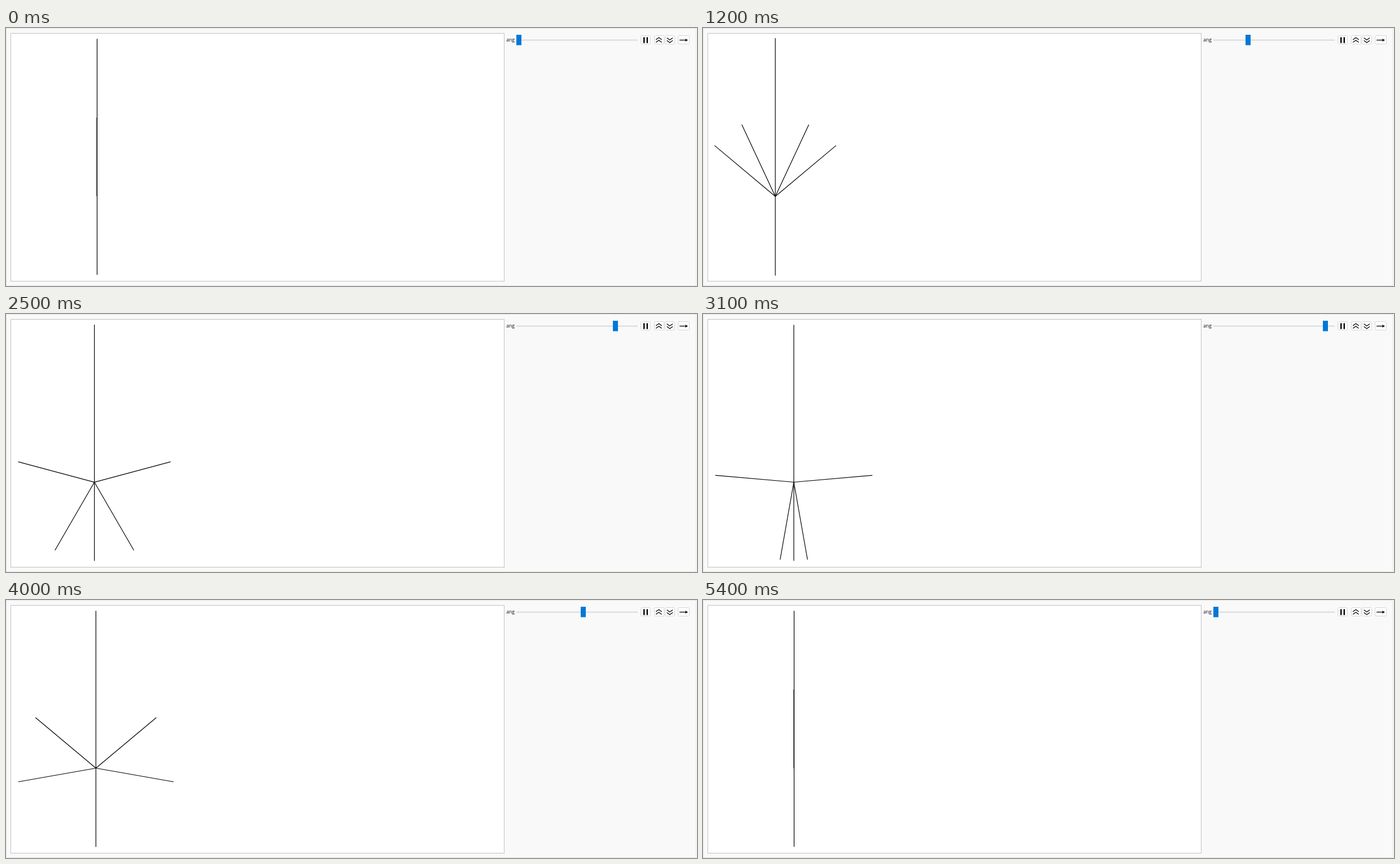
Animation of 1224 by 458 pixels, one loop 6000 ms. Source, as an HTML page with a canvas:

```html
<!DOCTYPE html>
<html lang="en">
<head>
<meta charset="utf-8">
<title>Angle slider</title>
<style>
  html, body { margin: 0; width: 100%; height: 100%; overflow: hidden; background: #fff; }
  canvas { display: block; }
</style>
</head>
<body>
<canvas id="stage" width="1224" height="458"></canvas>
<script>
const ctx = document.getElementById('stage').getContext('2d');
const LOOP = 6000;
const INK = '#000';

// The angle rises and falls in 5 degree steps, shown on a 100 ms grid.
function angleAt(ms) {
  const tick = Math.floor(ms / 100) * 100;
  const step = Math.max(0, Math.min(36, Math.ceil((tick - 550) / 137)));
  return 5 * (step <= 18 ? step : 36 - step);
}

function rect(x, y, w, h, fill) {
  ctx.fillStyle = fill;
  ctx.fillRect(x, y, w, h);
}

function frame(x, y, w, h, fill, stroke) {
  rect(x, y, w, h, fill);
  ctx.strokeStyle = stroke;
  ctx.lineWidth = 1;
  ctx.strokeRect(x + 0.5, y + 0.5, w - 1, h - 1);
}

function path(points, width) {
  ctx.beginPath();
  points.forEach(([x, y]) => ctx.lineTo(x, y));
  ctx.strokeStyle = INK;
  ctx.lineWidth = width;
  ctx.stroke();
}

function button(x, w) {
  ctx.beginPath();
  ctx.roundRect(x + 0.5, 13.5, w - 1, 15, 2);
  ctx.fillStyle = '#fefefe';
  ctx.fill();
  ctx.strokeStyle = '#d6d6d6';
  ctx.lineWidth = 1;
  ctx.stroke();
}

function chevron(x, y, dy) {
  path([[x - 5.2, y], [x, y + dy], [x + 5.2, y]], 1.3);
}

function drawControls(angle) {
  ctx.font = '8.7px "Open Sans", "Noto Sans", sans-serif';
  ctx.fillStyle = '#111';
  ctx.fillText('ang', 886.2, 24);

  rect(904, 20.5, 215, 2, '#dadada');
  rect(Math.floor(904 + 2.288 * angle), 12, 9, 18.5, '#0078d7');

  button(1124, 18);
  rect(1129, 16.3, 2.4, 10.4, INK);
  rect(1134.6, 16.3, 2.4, 10.4, INK);

  button(1148, 18);
  chevron(1156.4, 20.8, -3.8);
  chevron(1156.4, 25.6, -3.8);

  button(1167, 18);
  chevron(1175.8, 17.4, 3.8);
  chevron(1175.8, 22.2, 3.8);

  button(1190, 21);
  path([[1193, 21.5], [1205, 21.5]], 1.3);
  ctx.beginPath();
  ctx.moveTo(1208, 21.5);
  ctx.lineTo(1203, 18.7);
  ctx.lineTo(1204, 21.5);
  ctx.lineTo(1203, 24.3);
  ctx.fillStyle = INK;
  ctx.fill();
}

// The plot is scaled to a fixed height; its margin follows its width.
function drawSpokes(angle) {
  const a = angle * Math.PI / 180;
  const half = angle ? Math.max(Math.sin(a), Math.sin(2 * a)) : 1;
  const margin = 0.0208 * 2 * half;
  const unit = 430.4 / (3 + 2 * margin);
  const cx = 16 + unit * (margin + half);
  const cy = 228.7 + unit / 2;

  path([[cx, cy - 2 * unit], [cx, cy + unit]], 1.2);
  for (const turn of [-2 * a, -a, a, 2 * a]) {
    path([[cx, cy], [cx + unit * Math.sin(turn), cy - unit * Math.cos(turn)]], 1.2);
  }
}

function draw(now) {
  const angle = angleAt(now % LOOP);
  rect(0, 0, 1224, 458, '#fff');
  frame(0, 0, 1223, 458, '#f9f9f9', '#e4e4e4');
  frame(8, 9, 875, 441, '#fff', '#c0c0c0');
  drawSpokes(angle);
  drawControls(angle);
}

const start = performance.now();
function loop() {
  draw(performance.now() - start);
  requestAnimationFrame(loop);
}
loop();
</script>
</body>
</html>
```
